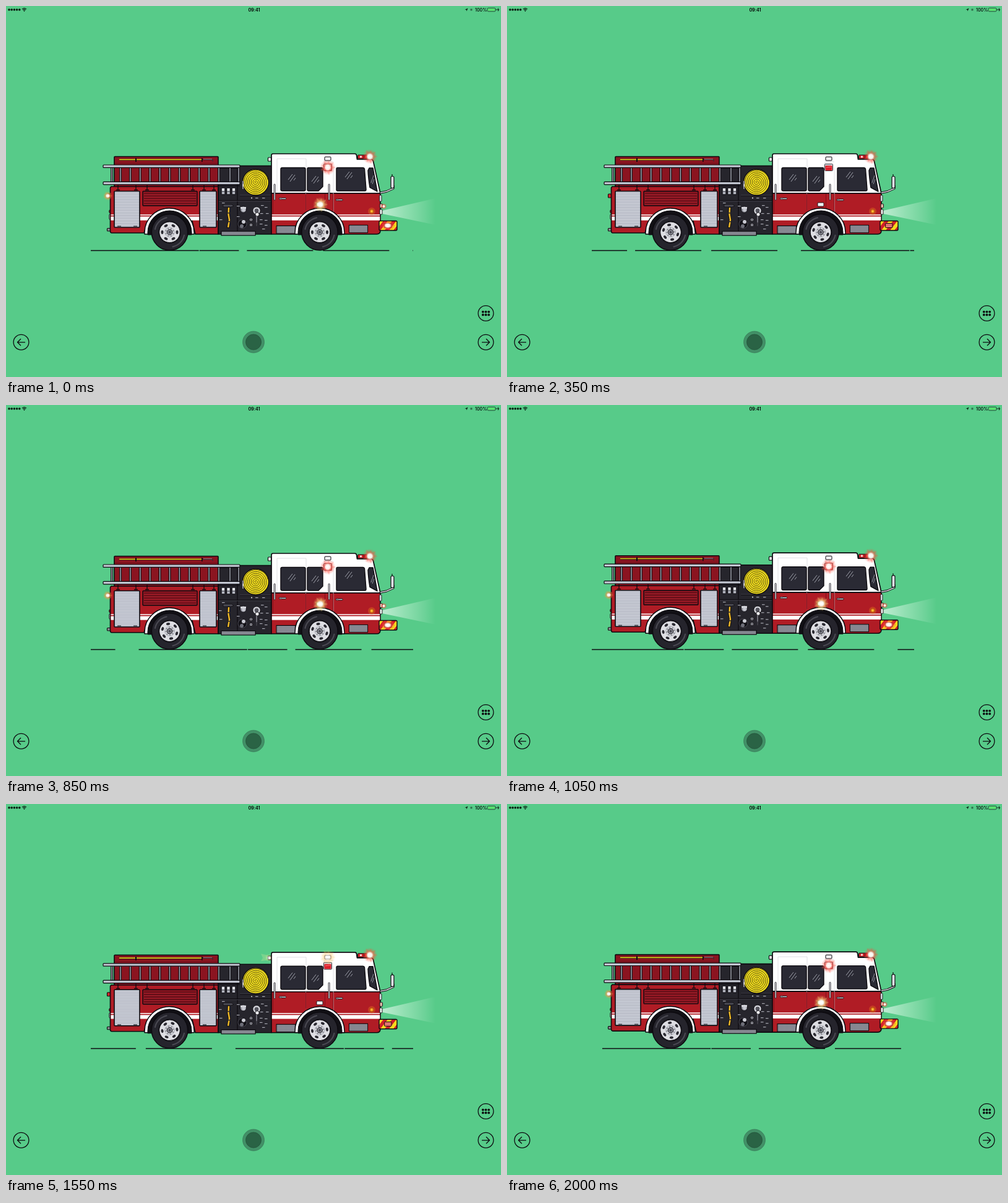
An HTML page that plays this animation: 800 by 600 pixels, repeating every 2050 ms.

```html
<!DOCTYPE html>
<html lang="en">
<head>
<meta charset="utf-8">
<title>Fire engine</title>
<style>
html, body { margin: 0; width: 100%; height: 100%; overflow: hidden; background: #57cb89; }
svg { display: block; width: 800px; height: 600px; }
text { font: 600 7.2px Inter, "Liberation Sans", sans-serif; }
</style>
</head>
<body>
<svg id="stage" viewBox="0 0 800 600"></svg>
<script>
const INK = '#0d0b10', RED = '#b01c25', DEEP = '#8b1420', DARK = '#26252c', STEEL = '#c3c7d2';

// Markup helpers
const rect = (x, y, w, h, fill, more = '') =>
  `<rect x="${x}" y="${y}" width="${w}" height="${h}" fill="${fill}" ${more}/>`;
const box = (x, y, w, h, fill, r = 1, sw = 1.2) =>
  rect(x, y, w, h, fill, `rx="${r}" stroke="${INK}" stroke-width="${sw}"`);
const disc = (x, y, r, fill, stroke = 'none', sw = 1) =>
  `<circle cx="${x}" cy="${y}" r="${r}" fill="${fill}" stroke="${stroke}" stroke-width="${sw}"/>`;
const shape = (d, fill, stroke = INK, sw = 1.4) =>
  `<path d="${d}" fill="${fill}" stroke="${stroke}" stroke-width="${sw}" stroke-linejoin="round"/>`;
const stroke = (d, color, sw = 1, cap = 'butt') =>
  `<path d="${d}" fill="none" stroke="${color}" stroke-width="${sw}" stroke-linecap="${cap}" stroke-linejoin="round"/>`;
const repeat = (n, fn) => Array.from({ length: n }, (_, i) => fn(i)).join('');

const glowColors = { red: '#ff4a3c', orange: '#ff9440', yellow: '#ffe680' };

function defs() {
  const glows = Object.entries(glowColors).map(([name, c]) =>
    `<radialGradient id="${name}">
      <stop offset="0" stop-color="#fff"/><stop offset=".3" stop-color="#fffaf4" stop-opacity=".92"/>
      <stop offset=".55" stop-color="${c}" stop-opacity=".42"/><stop offset="1" stop-color="${c}" stop-opacity="0"/>
    </radialGradient>`).join('');
  return `<defs>${glows}
    <linearGradient id="beam" gradientUnits="userSpaceOnUse" x1="608" x2="694" y1="0" y2="0">
      <stop offset="0" stop-color="#fff" stop-opacity=".62"/><stop offset=".5" stop-color="#eafff0" stop-opacity=".34"/>
      <stop offset="1" stop-color="#fff" stop-opacity="0"/></linearGradient>
    <pattern id="slats" width="4" height="2.6" patternUnits="userSpaceOnUse">
      <rect width="4" height="2.6" fill="#ced1da"/><rect width="4" height=".8" fill="#a3a7b4"/></pattern>
    <pattern id="mesh" width="2" height="2" patternUnits="userSpaceOnUse">
      <rect width="2" height="2" fill="#8d8f99"/><rect width="1" height="1" fill="#4c4c55"/><rect x="1" y="1" width="1" height="1" fill="#b3b5be"/></pattern>
    <pattern id="hazard" width="14" height="16" patternUnits="userSpaceOnUse" patternTransform="translate(610 347.5) skewX(-38)">
      <rect width="14" height="16" fill="#f6d91c"/><rect width="7" height="16" fill="#cf2029"/></pattern>
    <clipPath id="bumper"><rect x="603" y="347.5" width="29" height="15.5" rx="2"/></clipPath>
  </defs>`;
}

// Soft flash with faint spikes and a white core
function glow(x, y, r, color, cls = '') {
  const pts = repeat(18, i => {
    const a = i * Math.PI / 9, k = i % 2 ? r * .55 : r * (i % 4 ? .85 : 1.05);
    return `${(x + k * Math.cos(a)).toFixed(1)},${(y + k * Math.sin(a)).toFixed(1)} `;
  });
  return `<g class="${cls}"><polygon points="${pts}" fill="${glowColors[color]}" opacity=".26"/>
    <circle cx="${x}" cy="${y}" r="${r}" fill="url(#${color})"/></g>`;
}

function ladder() {
  const rung = x => box(x - 1.3, 261, 2.6, 24, '#aeb2be', 0, 1.2);
  const rail = y => box(157, y, 221, 4.4, STEEL, 1, 1.2);
  const xs = [171, ...Array.from({ length: 11 }, (_, i) => 185 + i * 15.9), 362, 376];
  return xs.map(rung).join('') + rail(257) + rail(284.4);
}

function rearBody() {
  const hook = x => stroke(`M${x - 3} 297.5h6M${x} 290v7`, INK, 1.3);
  return box(175, 243.5, 168, 50, DEEP, 1, 1.6)
    + stroke('M183 248.5H316', INK, 3) + stroke('M183 248.3H316', '#f3d81c', 1.7)
    + stroke('M316 248.5H334v3', '#3a2c33', 1.4) + stroke('M319 247.6H333', '#a9a3ab', .7)
    + rect(209, 246, 2, 6, INK) + rect(316, 246, 1.6, 6, INK)
    + stroke('M176 254.5H342', '#6d0f19', 1)
    + box(163.5, 304, 5, 6, '#d3262b', 1, 1.1) + box(163.5, 359.5, 6, 4.5, '#88888f', 1, 1.1)
    + box(166.8, 330, 3, 4.5, '#b01c25', 1, .9) + box(166.8, 337, 3, 8, '#e9e9ee', 1, .9)
    + shape('M170 292H343V369H306L300 344L265 328L231 344L223 367H171Q168.5 367 168.5 364V294Z', RED, INK, 1.6)
    + rect(169.5, 337.2, 173, 1.5, '#fff') + rect(169.5, 340.5, 173, 6.2, '#fff')
    + box(175, 299.5, 41, 58.5, 'url(#slats)', 1, 1.6) + box(313, 299.5, 27, 58.5, 'url(#slats)', 1, 1.6)
    + [180, 206, 318].map(x => rect(x, 355.5, 6, 2, '#44434c')).join('')
    + box(221, 299.5, 88, 23.5, DEEP, 1, 1.4)
    + repeat(5, i => stroke(`M223 ${303.5 + i * 4}H307`, '#4d0911', 1.2) + stroke(`M223 ${304.7 + i * 4}H307`, '#b5303a', .6))
    + [181, 210, 228, 302, 320, 336].map(hook).join('');
}

function hoseReel() {
  let d = 'M403.5 285';
  for (let a = .3; a < Math.PI * 14; a += .25) {
    const r = a * .46;
    d += `L${(403.5 + r * Math.cos(a)).toFixed(1)} ${(285 + r * Math.sin(a)).toFixed(1)}`;
  }
  return disc(403.5, 285, 21, '#f4df1d', INK, 1.3) + stroke(d, '#4d4612', .95)
    + stroke('M383 283v9', '#8d8d96', 2.2) + stroke('M383 288v8', '#dedee4', 1.2);
}

function pump() {
  const marks = [[351, 318], [346, 331], [347, 345], [375, 323], [375, 340], [414, 322], [420, 325], [413, 335],
    [422, 335], [412, 345], [420, 346], [412, 352], [420, 354], [416, 360], [405, 310], [416, 310]];
  const dial = (x, y, r) => disc(x, y, r, '#d8d9df', INK, 1) + disc(x, y, r * .55, '#55555e');
  return shape('M343 262H374V258.5H429V369H343Z', DARK, INK, 1.6)
    + stroke('M374 259V368M343 291H378M343 314.5H429M378 307H429', INK, 1.2)
    + stroke('M344 315.7H428M378 306H428', '#4c4b55', .7)
    + hoseReel()
    + [351, 359.5, 368].map(x => box(x - 3, 294, 6, 11, '#6e6f79', .5, 1) + rect(x - 2, 295, 4, 4, '#e4e5ea')
      + rect(x - 2, 301, 4, 3, '#b6b8c2')).join('')
    + marks.map(([x, y]) => rect(x - 2, y, 4.5, 1.2, '#a6a7b0')).join('') + disc(397, 310.5, .9, '#fff')
    + shape('M351 321H365L368 323.5L364 325H351Z', '#4a4a53', INK, .8)
    + stroke('M360 325L359.5 337L361 346L359 359', INK, 4.4) + stroke('M360 326L359.5 337L361 346L359 358', '#f0ba28', 2.5)
    + rect(357, 334, 6, 1.5, DARK) + rect(357, 348, 6, 1.5, DARK)
    + disc(383.5, 329, 5.2, '#8e8f99', INK, 1) + rect(379, 325, 9, 3, '#d6d7dd') + disc(384, 330, 2.8, '#c7c8d0')
    + stroke('M405 334V356', '#4c4b55', 1.2) + dial(405, 331, 6.2) + disc(406, 337, 3.2, '#ececf0', INK, 1)
    + stroke('M405 340V350', '#a0a1aa', 1)
    + disc(382, 352.5, 7, '#111016', '#4c4b55', 1) + disc(384, 349, 3.6, '#c9cad2', INK, 1) + disc(381, 356, 3, '#6d6e78')
    + dial(396, 345.5, 2.6) + dial(396, 354, 2.6)
    + box(348, 364.5, 55, 6.5, 'url(#mesh)', 0, 1.2);
}

function cab() {
  const shine = (x, y) => stroke(`M${x} ${y + 10}l7 -9M${x + 3} ${y + 13}l8 -11M${x + 9} ${y + 11}l3 -4`, '#aeb0ba', .9);
  const bar = x => box(x - 1, 288, 2.2, 26, '#d9dae0', 1, .7);
  const handle = (x, y) => box(x, y - 1.2, 11, 2.4, '#d6d7dd', 1, .9) + disc(x + 2.5, y, 1.6, '#77777f');
  const glass = '#2a2a34';
  return box(423.5, 245, 5, 6, '#f2f2f5', 1, 1.2)
    + shape('M429 303V241.5Q429 239 431.5 239H564Q566 239 566.5 241.5L567.5 248H590Q592.5 248 593.5 251L605 303Z', '#fff', INK, 1.7)
    + shape('M429 303H605V363Q605 369 599 369H543L541 348L507 328L473 348L470 369H429Z', RED, INK, 1.6)
    + stroke('M438 300V247H485V300M514 262V252H529M529 261V338M484.5 303V330', '#d9d9de', .8)
    + stroke('M431.5 304V336M484.5 304V330M528.5 304V337M515.5 304V330', '#7d101a', .9)
    + rect(429.8, 337.2, 174.5, 1.5, '#fff') + rect(429.8, 340.5, 174.5, 6.2, '#fff')
    + box(444, 261.5, 40, 37.5, glass, 2.5, 1.4)
    + shape('M489 261.5H510Q512 261.5 512 264V292L505 299H489Q487 299 487 297V263.5Q487 261.5 489 261.5Z', glass)
    + shape('M536 261.5H577Q579 261.5 579.5 263.5L582 296.5Q582 299 580 299H536Q534 299 534 297V263.5Q534 261.5 536 261.5Z', glass)
    + shape('M587 262H593L600 300L588 293.5Q585.5 278 585 266Z', glass)
    + shine(456, 271) + shine(494, 274) + shine(548, 267) + stroke('M590 286l4 -12M592 288l3 -8', '#aeb0ba', .8)
    + bar(434) + bar(522) + handle(441.5, 311.5) + handle(533, 313.5)
    + box(515, 244, 10, 6, '#e5e5ea', 1, 1) + rect(516.5, 245.5, 7, 2.5, '#fff')
    + box(513.5, 255.5, 13, 11, '#d5d6dc', 1, .8) + rect(514.5, 258, 11, 8, '#dc202b', 'rx="1"') + stroke('M516 261l8 -1', '#ff7175', 1)
    + box(502, 318, 10, 6, '#f4f4f7', 1, .9)
    + box(437, 355.5, 31, 12.5, 'url(#mesh)', 0, 1.1) + box(554.5, 354.5, 30, 12, 'url(#mesh)', 0, 1.1)
    + box(568.5, 241, 15, 6, '#d5232b', 1, 1) + rect(572, 242.3, 3, 3, '#fbd3d0') + rect(577, 242, 3, 4, '#7d151b')
    + box(603.5, 306, 3.5, 10, '#d5d6dc', 1, .8) + box(604, 320, 4.5, 6.5, '#ddb7a4', 1, .9) + box(604, 329, 4, 8, '#eef3ee', 1, .9)
    + stroke('M605 302L615 300L626 295V290', INK, 3.4) + stroke('M605 302L615 300L626 295V290', '#d8d9df', 1.5)
    + box(622, 275.5, 5, 19, '#dfe0e6', 2, 1.2) + stroke('M624 272v4', INK, 1.2)
    + `<g clip-path="url(#bumper)">${rect(603, 347, 30, 17, 'url(#hazard)')}</g>` + box(603, 347.5, 29, 15.5, 'none', 2, 1.4)
    + box(611.5, 351.5, 11.5, 7, '#d85a5c', 1, .9) + stroke('M613 354h8.5M613 356.5h8.5', '#f0b4ae', .7);
}

const arch = x =>
  shape(`M${x - 41} 369V366A39 38 0 0 1 ${x + 39} 366V369Z`, '#fff', INK, 1.5)
  + shape(`M${x - 36} 370V366A35 34.5 0 0 1 ${x + 35} 366V370Z`, '#111015', INK, 1);

function wheel(x) {
  const ring = (n, r, part) => repeat(n, i =>
    `<g transform="rotate(${(i + .5) * 360 / n}) translate(0 ${-r})">${part}</g>`);
  return `<g transform="translate(${x} 365.8)">
    ${disc(0, 0, 29.2, '#25242c', INK, 1.6)}
    ${stroke('M-23.5 -5A24 24 0 0 1 -5 -23.5M23.5 5A24 24 0 0 1 5 23.5', '#494851', 2.2, 'round')}
    ${disc(0, 0, 18.5, '#17161c')}
    <g class="rim">${disc(0, 0, 16.8, '#dedee3', INK, 1)}
      ${ring(6, 12, '<ellipse rx="3.1" ry="2" fill="#2b2a32"/>')}
      ${disc(0, 0, 8, '#cfd0d7', '#a3a4ae', .6)}${ring(8, 6.4, disc(0, 0, .8, '#55555e'))}
      ${disc(0, 0, 4.3, '#8b8c96', INK, .9)}${disc(0, 0, 2, '#4c4c55')}</g>
  </g>`;
}

function statusBar() {
  return repeat(5, i => disc(5 + i * 4.2, 6, 1.8, '#0a1a10'))
    + stroke('M26 5.2Q29.5 2 33 5.2M27.3 6.7Q29.5 4.7 31.7 6.7', '#0a1a10', 1.1) + disc(29.5, 8, .9, '#0a1a10')
    + '<text x="401" y="8.6" text-anchor="middle">09:41</text>'
    + shape('M741.5 6L746.5 3.5L744.5 8.5L744 6.2Z', '#0a1a10', 'none', 0)
    + rect(750.5, 4.5, 3, 3, '#2f6b4b')
    + '<text x="758" y="8.6" style="font-weight:500">100%</text>'
    + rect(778, 3.2, 13, 5.6, 'none', 'rx="1.4" stroke="#0a1a10" stroke-width=".7"') + rect(779, 4.2, 11, 3.6, '#59e26d', 'rx=".6"')
    + rect(791.8, 5, .9, 2, '#0a1a10') + shape('M796 2.8L793.5 6.4H795.3L794.8 9.2L797.4 5.5H795.6Z', '#0a1a10', 'none', 0);
}

function buttons() {
  const ring = (x, y) => disc(x, y, 12.4, 'none', INK, 1.3);
  return ring(24.5, 543.8) + stroke('M31 543.8H18.5M24 538.3L18.5 543.8L24 549.3', INK, 1.3)
    + ring(775.5, 543.8) + stroke('M769 543.8H781.5M776 538.3L781.5 543.8L776 549.3', INK, 1.3)
    + ring(775.5, 497) + repeat(6, i => disc(770.8 + i % 3 * 4.7, 494.6 + (i > 2) * 4.8, 1.9, INK))
    + disc(400, 543.5, 17.4, '#429067', '#397c58', .8) + disc(400, 543.5, 12.5, '#2a6345', '#225239', .8);
}

const stage = document.getElementById('stage');
stage.innerHTML = defs() + statusBar() + buttons()
  + `<path id="road" d="M137 395.5H658" stroke="${INK}" stroke-width="1.3" stroke-dasharray="175.2 1.2 63.6 13 107 16 107 38"/>
  <g id="truck">
    <path d="M608 331L694 311V354L608 336Z" fill="url(#beam)"/>
    ${rearBody()}${pump()}${ladder()}${cab()}${arch(265)}${arch(508)}
    <circle cx="591" cy="332" r="6" fill="#f07a1c" opacity=".35"/>
    ${disc(591, 332, 3.4, '#e8821e', '#a34512', .8)}${disc(591, 332, 1.3, '#ffd23c')}
    ${glow(588, 243.5, 12, 'red')}<g opacity=".35">${glow(588, 243.5, 11.5, 'orange', 'b')}</g>
    ${glow(520, 261, 12.5, 'red', 'a')}${glow(508, 321, 12, 'yellow', 'a')}
    <g transform="translate(617 355) scale(1.1 .8)">${glow(0, 0, 11, 'red', 'a')}</g>
    ${glow(164.5, 307, 7.5, 'orange', 'a')}${glow(610.5, 324, 5, 'red', 'a')}
    ${glow(520, 247, 12.5, 'yellow', 'b')}<g opacity=".5">${glow(520, 247, 12, 'orange', 'b')}</g>
    <g class="b"><path d="M427 244.5L412 241.5L415 248L412 253.5L427 251Z" fill="#f6f3a0" opacity=".4"/>
      <circle cx="424" cy="248" r="6.5" fill="url(#yellow)"/></g>
  </g>` + wheel(264.5) + wheel(507);

const road = document.getElementById('road'), truck = document.getElementById('truck');
const rims = stage.querySelectorAll('.rim');
const flashA = stage.querySelectorAll('.a'), flashB = stage.querySelectorAll('.b');

const STEP = 50, STEPS = 41, LAP = 521;
const clamp = v => Math.max(0, Math.min(1, v));
const pulse = (p, from, to, ramp) => clamp(Math.min(p - from, to - p) / ramp);

// Distance driven; it slows a little before the loop ends
const travel = n => n <= 31 ? n * 26.05 : 807.55 + (n - 31) * 24.1;

function draw(ms) {
  const d = travel(Math.floor(ms / STEP) % STEPS);
  const laps = d / LAP, p = laps % 1;
  road.setAttribute('stroke-dashoffset', d + .6);
  truck.setAttribute('transform', `translate(0 ${(.5 - .5 * Math.cos(laps * 6 * Math.PI)).toFixed(2)})`);
  rims.forEach(r => r.setAttribute('transform', `rotate(${(laps * 1080 % 360).toFixed(1)})`));
  const a = pulse(p < .3 ? p + 1 : p, .78, 1.12, .06), b = pulse(p, .38, .6, .09);
  flashA.forEach(e => e.setAttribute('opacity', a));
  flashB.forEach(e => e.setAttribute('opacity', b));
}

const start = performance.now();
function tick() {
  draw(performance.now() - start);
  requestAnimationFrame(tick);
}
tick();
</script>
</body>
</html>
```
